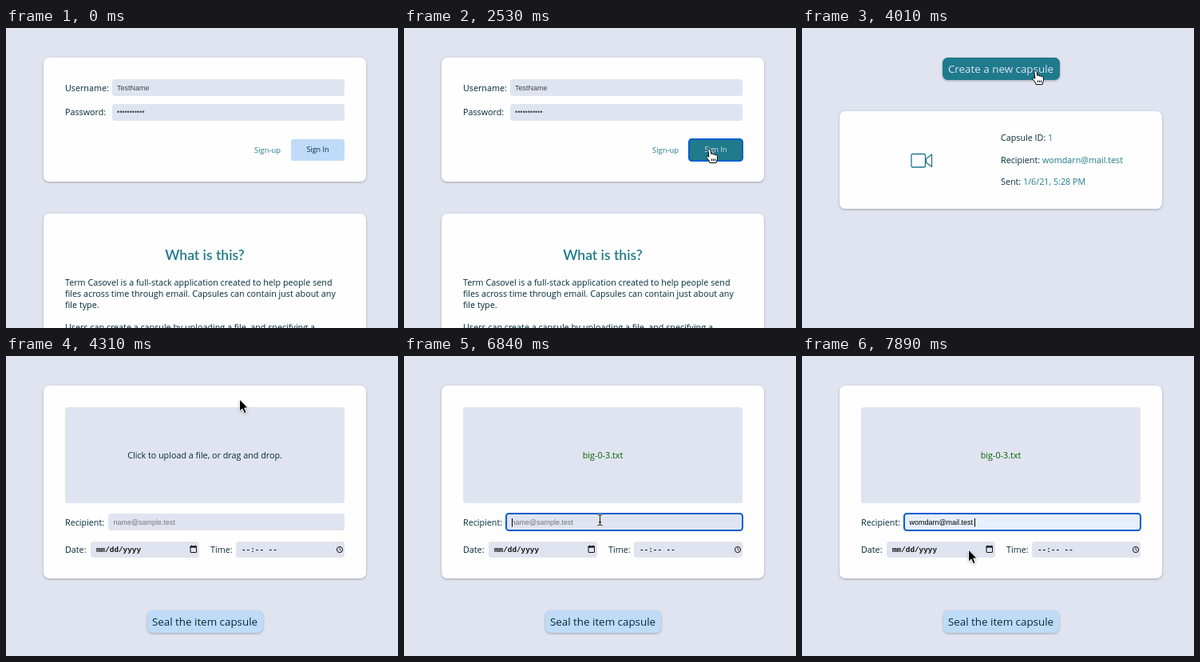
Write an HTML page that moves like this. It is 491 px wide and 375 px high and loops after 8 s.

```html
<!DOCTYPE html>
<html lang="en">
<head>
<meta charset="utf-8">
<title>Capsule demo</title>
<style>
  html, body { margin: 0; width: 100%; height: 100%; overflow: hidden; background: #e0e4f0; }
  svg { display: block; width: 491px; height: 375px; }
  text { font: 10.75px "Open Sans", sans-serif; fill: #022b3a; white-space: pre; }
  .card { fill: #fefefe; filter: drop-shadow(0 1px 1.6px rgba(0,0,0,.28)); }
  .field { fill: #e0e4f0; }
  .btn { fill: #bfdbf7; }
  .raised { filter: drop-shadow(0 1px 1.6px rgba(0,0,0,.28)); }
  .big text { font-size: 13.4px; }
  .hover .btn { fill: #1f7a8c; }
  .hover text { fill: #e1e5f2; }
  .mid { text-anchor: middle; }
  .teal { fill: #1f7a8c; }
  text.input { font: 8.97px "Liberation Sans", Arial, sans-serif; fill: #444; }
  text.hint { fill: #757575; }
  text.typed { fill: #000; }
  text.mono { font: bold 9.33px "Liberation Mono", monospace; fill: #111; }
  text.title { font: 600 17.5px Lato, sans-serif; fill: #1f7a8c; }
  text.menu { font: 8.7px Inter, sans-serif; fill: #222; }
  .ring { fill: none; stroke: #005fcc; stroke-width: 2; }
  .icon { fill: none; stroke: #1f7a8c; stroke-width: 1.3; stroke-linejoin: round; }
</style>
</head>
<body>
<svg id="stage" viewBox="0 0 491 375" xmlns="http://www.w3.org/2000/svg"></svg>
<script>
const LOOP = 8000;
const EMAIL = 'womdarn@mail.test';
const FILE = 'big-0-3.txt';

const rect = (x, y, x2, y2, r, cls, extra = '') =>
  `<rect x="${x}" y="${y}" width="${x2 - x}" height="${y2 - y}" rx="${r}" class="${cls}" ${extra}/>`;
const text = (x, y, str, cls = '', extra = '') =>
  `<text x="${x}" y="${y}" class="${cls}" ${extra}>${str}</text>`;
const group = (id, body, cls = '') => `<g id="${id}" class="${cls}">${body}</g>`;
const card = (y, y2) => rect(47, y, 451, y2, 7, 'card');
const field = (x, y, x2, y2) => rect(x, y, x2, y2, 3.5, 'field');
const pair = (y, label, value) =>
  text(249, y, `${label}: <tspan class="teal">${value}</tspan>`);

const login = group('login',
  card(37, 192) +
  text(74, 79, 'Username:') + field(133, 64, 424, 85) + text(139, 78, 'TestName', 'input') +
  text(74, 109, 'Password:') + field(133, 95, 424, 116) + text(139, 108, '•'.repeat(11), 'input') +
  text(327.5, 156, 'Sign-up', 'mid teal', 'style="font-size:9.4px"') +
  group('signIn',
    rect(357, 139, 424, 166, 3.5, 'btn') +
    text(390.5, 155, 'Sign In', 'mid', 'style="font-size:8.97px"')) +
  rect(357, 139, 424, 166, 3.5, 'ring', 'id="signRing"') +
  card(232, 400) +
  text(249, 290, 'What is this?', 'title mid') +
  ['Term Casovel is a full-stack application created to help people send',
   'files across time through email. Capsules can contain just about any',
   'file type.', '',
   'Users can create a capsule by uploading a file, and specifying a']
    .map((line, i) => text(74, 322 + 14 * i, line)).join(''));

const list = group('list',
  group('create',
    rect(176, 37, 323, 65, 6.5, 'btn raised') + text(249, 56, 'Create a new capsule', 'mid'), 'big') +
  card(104, 226) +
  `<g class="icon"><rect x="137" y="157.5" width="17.5" height="16.5" rx="2"/>
   <path d="M155.5 163.5L162.5 158V173.5L155.5 168Z"/></g>` +
  pair(141, 'Capsule ID', '1') + pair(169, 'Recipient', EMAIL) + pair(196, 'Sent', '1/6/21, 5:28 PM'));

const form = group('form',
  card(37, 278) + field(74, 64, 424, 184) +
  text(249, 128, '', 'mid', 'id="drop"') +
  text(74, 212, 'Recipient:') +
  rect(128, 197, 424, 218, 3.5, 'field', 'id="mail"') +
  text(134.5, 211, 'name@sample.test', 'input hint', 'id="hint"') +
  text(134.5, 211, EMAIL, 'input typed', 'id="typed"') +
  rect(128, 197, 424, 218, 3.5, 'ring', 'id="mailRing"') +
  '<path id="caret" d="M0 203V213.5" stroke="#000"/>' +
  text(74, 246, 'Date:') + field(106, 232, 242, 252) + text(113, 245, 'mm/dd/yyyy', 'mono') +
  text(256, 246, 'Time:') + field(288, 232, 424, 252) + text(295, 245, '--:-- --', 'mono') +
  `<g fill="none" stroke="#111"><rect x="231" y="238" width="7.5" height="7.5" rx=".5"/>
   <path d="M230.6 238.6H239" stroke-width="2"/><path d="M232.5 236.6V238M237 236.6V238"/>
   <circle cx="418" cy="242" r="3.6"/><path d="M418 239.6V242.2L419.6 243.2" stroke-width=".8"/></g>` +
  group('seal',
    rect(177, 318, 322, 346, 6.5, 'btn raised') + text(249, 337, 'Seal the item capsule', 'mid'), 'big') +
  group('menu',
    rect(128, 220, 424, 274, 3, 'card') + rect(128, 223, 424, 249, 0, '', 'id="row" fill="#e8e8ea"') +
    text(137, 239, EMAIL, 'menu') + '<path d="M128 251.5H424" stroke="#e3e3e3"/>' +
    text(137, 265, 'Manage…', 'menu')));

// Dragged document, placed relative to the pointer tip
const rules = Array.from({ length: 9 }, (_, i) =>
  `M-22 ${-39 + i * 2.4}h${[24, 17, 25, 21, 26][i % 5]}`).join('');
const drag = group('drag',
  `<g opacity=".93"><path d="M-26 -43H2L20 -27V18H-26Z" fill="#f6f6f6" stroke="#cfcfcf" stroke-width=".7" class="raised"/>
   <path d="${rules}" stroke="#c4c4c4" stroke-width=".7" stroke-dasharray="5 1 3 1"/>
   <path d="M2 -43C6 -38 5 -32 3 -28C9 -30 15 -29 20 -27Z" fill="#e3e3e3" stroke="#c8c8c8" stroke-width=".6"/>
   <text x="-3" y="12" class="mid" style="font:9.5px Inter,sans-serif;fill:#8a8a8a">TXT</text>
   <rect x="-41.5" y="25" width="75" height="17" rx="2.5" fill="#5685e0"/></g>
   <text x="-4" y="37.5" class="mid" style="font:600 12.3px Inter,sans-serif;fill:#fff">${FILE}</text>`);
const badge = `<g id="badge"><circle cx="10" cy="21.5" r="9.3" fill="#2c9c1c" stroke="#1f7f13" stroke-width=".6"/>
  <path d="M10 16.5v10M5 21.5h10" stroke="#fff" stroke-width="2.6"/></g>`;

const pointers = `
  <path id="arrow" d="M0 0V15.2L3.5 12L6 17.8L8.7 16.6L6.2 11H10.8Z" fill="#000" stroke="#fff" stroke-width="1" class="raised"/>
  <path id="hand" d="M-1.6 .8C-1.6 -.9 1.4 -.9 1.6 .8L2.2 5.5C2.7 4.6 4.6 4.8 4.8 6.3C5.3 5.3 7.2 5.6 7.4 7C8.1 6.2 9.9 6.6 9.9 8.2V11.5L8.6 16.6H.6L-.4 14L-3.6 9.8C-4.2 8.3 -2.4 7.5 -.6 9.2Z
    M3 11.5V14M5 11.5V14M7 11.5V14" fill="#fff" stroke="#000" stroke-width="1"/>
  <g id="beam" fill="none"><path d="M-3 -7Q0 -7 0 -5Q0 -7 3 -7M0 -5V5M-3 7Q0 7 0 5Q0 7 3 7" stroke="#fff" stroke-width="2.4" opacity=".7"/>
    <path d="M-3 -7Q0 -7 0 -5Q0 -7 3 -7M0 -5V5M-3 7Q0 7 0 5Q0 7 3 7M-1.5 2.5H1.5" stroke="#000"/></g>`;

document.getElementById('stage').innerHTML =
  login + list + form + `<g id="pointer">${drag}${pointers}${badge}</g>`;

const $ = id => document.getElementById(id);
const show = (id, on) => $(id).setAttribute('display', on ? 'inline' : 'none');

const bursts = [[0, 0, 1], [1050, 1050, 1], [1500, 2090, 5], [2390, 2680, 3], [3130, 4160, 8],
  [4310, 4910, 5], [5810, 6840, 8], [6990, 7290, 3], [7590, 7890, 3]];
const ticks = bursts.flatMap(([a, b, n]) =>
  Array.from({ length: n }, (_, i) => Math.floor((a + (b - a) * i / Math.max(1, n - 1)) / 10) * 10));
const snap = t => ticks.filter(k => k <= t).pop();

// Pointer paths: time, x, y
const paths = [
  [[1050, 424, 300], [1500, 418, 280], [1790, 394, 186], [1940, 384, 155], [2090, 382.5, 152],
   [2980, 382.5, 152], [3130, 364, 136], [3420, 311.5, 89], [3570, 301, 70], [3710, 294, 57],
   [3860, 292.5, 54], [4310, 292.5, 54], [4460, 302, 92], [4610, 325, 180], [4760, 350, 290]],
  [[5810, 260.5, 221.5], [5950, 255, 180], [6100, 250, 148], [6250, 247, 134], [6390, 247, 136],
   [6540, 246, 172], [6690, 245.5, 205], [6990, 245.5, 205], [7140, 228, 228],
   [7290, 212, 240], [7590, 209, 242], [7740, 208.5, 242], [8000, 208.5, 242]]
];

function pointerAt(t) {
  const path = paths.find(p => t >= p[0][0] && t <= p[p.length - 1][0]);
  if (!path) return null;
  const i = Math.max(1, path.findIndex(k => k[0] >= t));
  const [t0, x0, y0] = path[i - 1], [t1, x1, y1] = path[i];
  const u = (t - t0) / (t1 - t0);
  return { x: x0 + (x1 - x0) * u, y: y0 + (y1 - y0) * u };
}

const inside = (p, x, y, x2, y2) => !!p && p.x >= x && p.x <= x2 && p.y >= y && p.y <= y2;

function draw(time) {
  const t = snap(time);
  const page = t < 2680 ? 'login' : t < 4310 ? 'list' : 'form';
  const p = pointerAt(t);
  ['login', 'list', 'form'].forEach(id => show(id, id === page));

  const overSign = page === 'login' && inside(p, 357, 139, 424, 166);
  const overCreate = page === 'list' && inside(p, 176, 37, 323, 65);
  const overMail = page === 'form' && inside(p, 128, 197, 424, 218);
  $('signIn').classList.toggle('hover', overSign);
  $('create').classList.toggle('hover', overCreate);
  show('signRing', t >= 2390);

  const dragging = t >= 5810 && t < 6250;
  const dropped = t >= 6250;
  const focused = t >= 6840;
  const filled = t >= 7290;
  $('drop').textContent = dropped ? FILE : 'Click to upload a file, or drag and drop.';
  $('drop').style.fill = dropped ? '#006400' : '';
  $('mail').style.fill = filled ? '#e8effc' : '';
  show('hint', !filled);
  show('typed', filled);
  show('mailRing', focused);
  show('caret', focused);
  $('caret').setAttribute('transform', `translate(${filled ? 216.5 : 135.5} 0)`);
  show('menu', t >= 6990 && t < 7740);
  show('row', filled);

  show('pointer', p);
  if (!p) return;
  $('pointer').setAttribute('transform', `translate(${p.x.toFixed(2)} ${p.y.toFixed(2)})`);
  const hand = overSign || overCreate;
  const beam = overMail && !dragging;
  show('hand', hand);
  show('beam', beam);
  show('arrow', !hand && !beam);
  show('drag', dragging);
  show('badge', dragging);
}

const start = performance.now();
function frame() {
  draw((performance.now() - start) % LOOP);
  requestAnimationFrame(frame);
}
frame();
</script>
</body>
</html>
```
